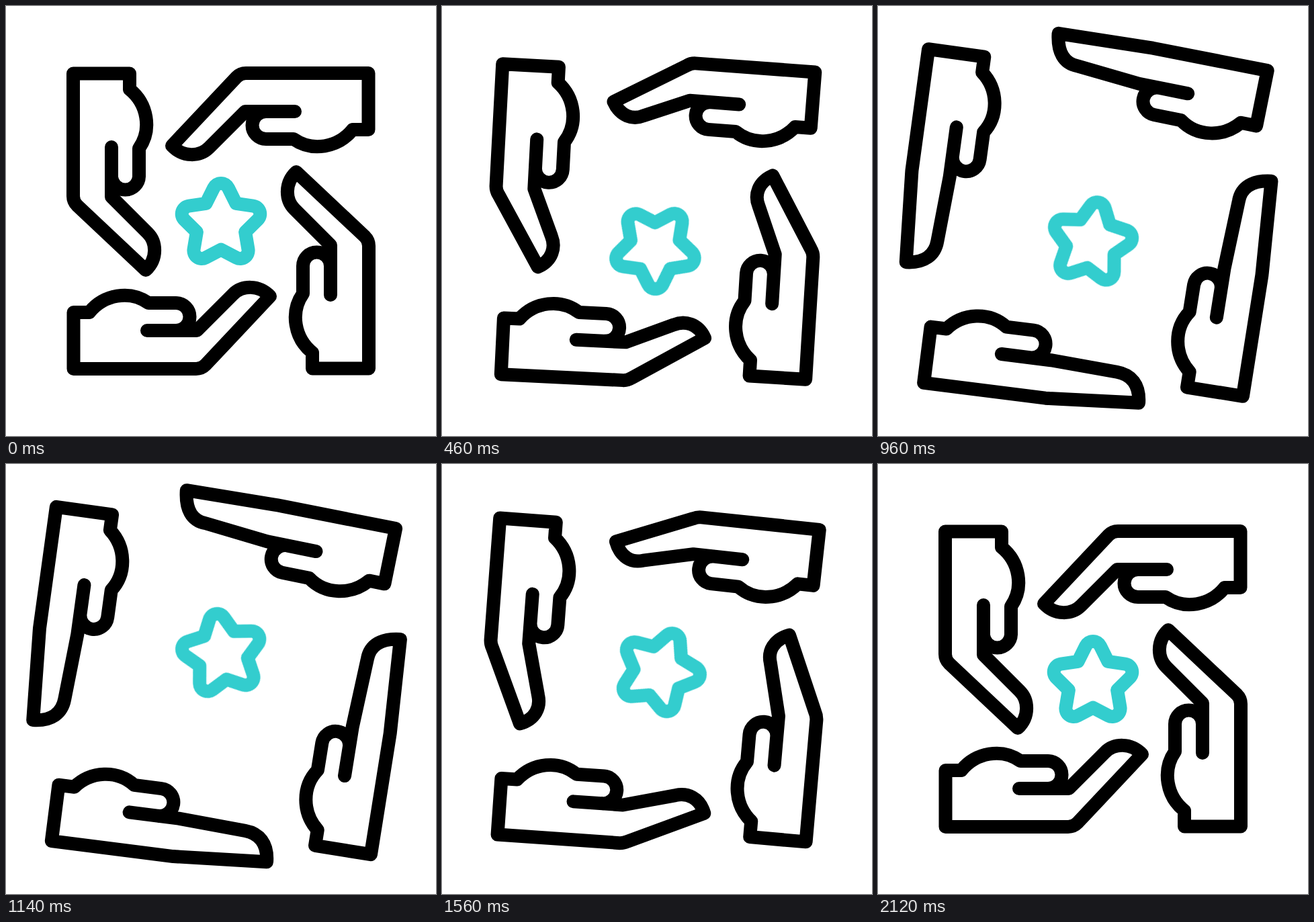
These frames come from a looping animation (640 px wide and 640 px high, 2400 ms). An HTML page:

```html
<!DOCTYPE html>
<html lang="en">
<head>
<meta charset="utf-8">
<title>Hands around a star</title>
<style>
  html, body { margin: 0; width: 100%; height: 100%; overflow: hidden; background: #fff; }
  svg { display: block; width: 100vw; height: 100vh; }
  path { fill: none; stroke-width: 20; stroke-linecap: round; stroke-linejoin: round; }
  #hands path { stroke: #000; }
  #star { stroke: #33cdce; transform-origin: 320px 320px; }
</style>
</head>
<body>
<svg viewBox="0 0 640 640">
  <g id="hands"></g>
  <g id="bob"><path id="star"/></g>
</svg>
<script>
const LOOP = 2400, PEAK = 1066, REST = 2108, SPIN = 2100, BOB = 236, RISE = 37;
const EASE = 'ease-in-out';

const mix = (a, b, k) => [a[0] + (b[0] - a[0]) * k, a[1] + (b[1] - a[1]) * k];
const add = (p, dx, dy) => [p[0] + dx, p[1] + dy];
const fmt = p => p.map(v => v.toFixed(2)).join(' ');

function play(el, frames) {
  el.animate(frames.map(f => ({ easing: EASE, ...f })), { duration: LOOP, iterations: Infinity });
}

// Palm outline, from the heel of the hand round to the end of the thumb.
const HEEL = [100.5, 540];
const PALM = [
  HEEL, [100.5, 456], [124, 456],
  [145.3, 429.5], [184, 422.4], [212, 442],
  [253, 442],
  [264.3, 442], [273.5, 451.2], [273.5, 462.5],
  [273.5, 473.8], [264.3, 483], [253, 483]
];
const CREASE = [210, 483], KNUCKLE = [284, 483];
const FINGER = [[338, 429], [351, 416], [376, 414], [393, 432]];

function handPath(move, finger, bend, bendEnd, bendCtrl) {
  const p = PALM.map(move).map(fmt);
  const [a, c1, c2, tip] = finger.map(fmt);
  return `M${fmt(move(CREASE))} L${fmt(move(KNUCKLE))} L${a} C${c1} ${c2} ${tip}` +
    ` L${fmt(bendEnd)} Q${fmt(bendCtrl)} ${fmt(bend)}` +
    ` L${p[0]} L${p[1]} L${p[2]} C${p[3]} ${p[4]} ${p[5]} L${p[6]}` +
    ` C${p[7]} ${p[8]} ${p[9]} C${p[10]} ${p[11]} ${p[12]}`;
}

const restPath = handPath(p => p, FINGER, [283, 540], [297, 534], [291, 540]);

function openPath({ heel, tilt, bend, base, tip }) {
  const t = tilt * Math.PI / 180, c = Math.cos(t), s = Math.sin(t);
  const move = ([x, y]) => {
    const dx = x - HEEL[0], dy = y - HEEL[1];
    return add(heel, dx * c - dy * s, dx * s + dy * c);
  };
  const finger = [base, add(base, 21, 4), add(tip, 2, -28), tip];
  return handPath(move, finger, bend, mix(bend, tip, 0.07), mix(bend, tip, 0.035));
}

// Open poses, each given in the frame of the bottom hand.
const HANDS = [
  { turn: 0,   heel: [67.5, 561.3], tilt: 7.3,  bend: [248.5, 584.5], base: [356, 547], tip: [388, 593.8] },
  { turn: 90,  heel: [63.5, 565.4], tilt: 7.9,  bend: [244, 590.5],   base: [350, 554], tip: [381, 601.5] },
  { turn: 180, heel: [59.5, 544],   tilt: 11.6, bend: [230, 578],     base: [343, 553], tip: [371, 602.5] },
  { turn: 270, heel: [58.4, 543],   tilt: 9.2,  bend: [238.5, 572],   base: [350, 539], tip: [379, 588.5] }
];

for (const hand of HANDS) {
  const el = document.createElementNS('http://www.w3.org/2000/svg', 'path');
  el.setAttribute('d', restPath);
  el.setAttribute('transform', `rotate(${hand.turn} 320 320)`);
  document.getElementById('hands').append(el);
  const rest = `path("${restPath}")`, open = `path("${openPath(hand)}")`;
  play(el, [
    { d: rest, offset: 0 },
    { d: open, offset: PEAK / LOOP },
    { d: rest, offset: REST / LOOP },
    { d: rest, offset: 1 }
  ]);
}

// Five-pointed star with rounded tips.
const star = document.getElementById('star');
const polar = (r, deg) => {
  const a = deg * Math.PI / 180;
  return fmt([320 + r * Math.sin(a), 324.6 - r * Math.cos(a)]);
};
let outline = '';
for (let a = 0; a < 360; a += 72) {
  outline += `${a ? 'L' : 'M'}${polar(55, a - 11.3)} A12 12 0 0 1 ${polar(55, a + 11.3)} L${polar(38, a + 36)} `;
}
star.setAttribute('d', outline + 'Z');

play(star, [
  { transform: 'rotate(0deg)', offset: 0 },
  { transform: 'rotate(360deg)', offset: SPIN / LOOP },
  { transform: 'rotate(360deg)', offset: 1 }
]);

const shift = (y, offset) => ({ transform: `translateY(${y}px)`, offset });
const steps = [shift(0, 0)];
for (let i = 1; i < 9; i++) steps.push(shift(i % 2 ? -RISE : RISE, i * BOB / LOOP));
steps.push(shift(0, 9 * BOB / LOOP), shift(0, 1));
play(document.getElementById('bob'), steps);
</script>
</body>
</html>
```
